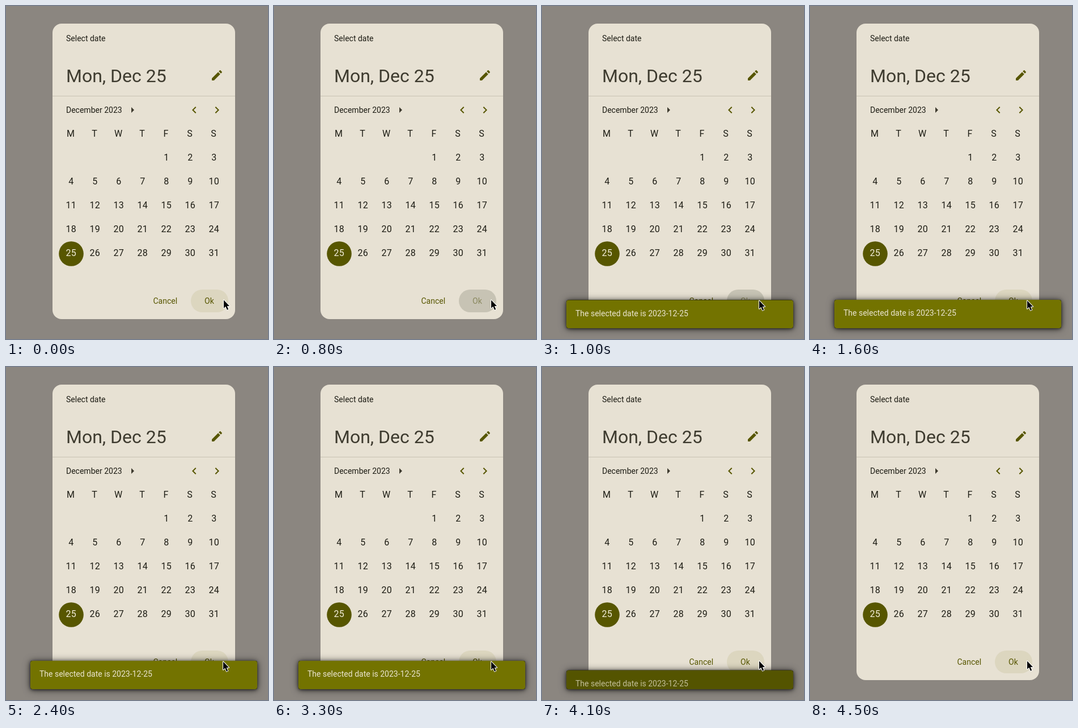
Animation, 462 px wide and 586 px high, one loop 7000 ms. Source, as an HTML page with a canvas:

```html
<!DOCTYPE html>
<html lang="en">
<head>
<meta charset="utf-8">
<title>Select date</title>
<style>
html, body { margin: 0; width: 100%; height: 100%; overflow: hidden; background: #8b8680; }
canvas { display: block; width: 462px; height: 586px; }
</style>
</head>
<body>
<canvas id="stage"></canvas>
<script>
const LOOP = 7000;
const W = 462, H = 586;
const OLIVE = '#575600', INK = '#1d1c14';
const canvas = document.getElementById('stage');
const ratio = window.devicePixelRatio || 1;
canvas.width = W * ratio;
canvas.height = H * ratio;
const ctx = canvas.getContext('2d');

const icons = {
  edit: new Path2D('M3 17.25V21h3.75L17.81 9.94l-3.75-3.75L3 17.25zM20.71 7.04c.39-.39.39-1.02 0-1.41l-2.34-2.34c-.39-.39-1.02-.39-1.41 0l-1.83 1.83 3.75 3.75 1.83-1.83z'),
  left: new Path2D('M15.41 7.41L14 6l-6 6 6 6 1.41-1.41L10.83 12z'),
  right: new Path2D('M10 6L8.59 7.41 13.17 12l-4.58 4.59L10 18l6-6z'),
  drop: new Path2D('M10 17l5-5-5-5z'),
  pointer: new Path2D('M0 0V14.2L3.3 11.2 5.9 17.2 8.2 16.2 5.7 10.4H10z')
};

const clamp = v => Math.min(1, Math.max(0, v));
const ramp = (t, from, to) => clamp((t - from) / (to - from));
const quart = v => v < 0.5 ? 8 * v ** 4 : 1 - (2 - 2 * v) ** 4 / 2;

function text(str, x, y, size, color, align = 'left') {
  ctx.font = `400 ${size}px Roboto, sans-serif`;
  ctx.textAlign = align;
  ctx.fillStyle = color;
  ctx.fillText(str, x, y);
}

function pill(x, y, w, h, r) {
  ctx.beginPath();
  ctx.roundRect(x, y, w, h, r);
}

function icon(path, x, y, color) {
  ctx.save();
  ctx.translate(x, y);
  ctx.fillStyle = color;
  ctx.fill(path);
  ctx.restore();
}

function drawCalendar() {
  [...'MTWTFSS'].forEach((d, i) => text(d, 114 + i * 42, 230, 16, INK, 'center'));
  ctx.fillStyle = OLIVE;
  ctx.beginPath();
  ctx.arc(115, 436, 21.8, 0, Math.PI * 2);
  ctx.fill();
  for (let day = 1; day <= 31; day++) {
    const cell = day + 3;
    const x = 114.8 + cell % 7 * 42;
    const y = 272 + Math.floor(cell / 7) * 42;
    ctx.letterSpacing = day > 9 ? '0.4px' : '0px';
    text(String(day), x, y, 16, day === 25 ? '#f3eedb' : INK, 'center');
  }
  ctx.letterSpacing = '0px';
}

function drawDialog() {
  ctx.fillStyle = '#e7e1d3';
  pill(82, 31, 322, 520, 16);
  ctx.fill();
  text('Select date', 106, 62, 14, INK);
  text('Mon, Dec 25', 106, 134, 32, '#3e3b2f');
  icon(icons.edit, 360, 110, OLIVE);
  ctx.fillStyle = '#c8c2b3';
  ctx.fillRect(82, 158, 322, 1);
  text('December 2023', 106, 188, 14, INK);
  icon(icons.drop, 211, 171, '#3e3b2f');
  icon(icons.left, 320, 171, OLIVE);
  icon(icons.right, 360, 171, OLIVE);
  drawCalendar();
  text('Cancel', 259.5, 524, 14, OLIVE);
}

function drawButton(t) {
  ctx.save();
  pill(326, 499, 66, 40, 20);
  ctx.fillStyle = '#dcd6bf';
  ctx.fill();
  ctx.clip();
  text('Ok', 350, 524, 14, OLIVE);
  const press = ramp(t, 480, 760) * (1 - ramp(t, 1000, 1300));
  if (press > 0) {
    ctx.globalAlpha = 0.54 * press;
    ctx.fillStyle = '#b5b3ac';
    ctx.beginPath();
    ctx.arc(376, 522, 14 + 46 * ramp(t, 480, 720), 0, Math.PI * 2);
    ctx.fill();
  }
  ctx.restore();
}

function drawSnackBar(t) {
  const v = t < 2500 ? ramp(t, 800, 1050) : 1 - ramp(t, 3988, 4238);
  const grow = quart(v);
  const h = 50 * grow;
  if (h < 0.5) return;
  const top = 567 - h;
  const leaving = t > 2500;
  const alpha = leaving ? grow ** 0.75 : ramp(v, 0.35, 0.65);

  ctx.save();
  ctx.globalAlpha = leaving ? clamp(grow * 1.5) : alpha;
  ctx.fillStyle = '#000';
  for (const [blur, shade] of [[13, 0.75], [5, 0.6]]) {
    ctx.shadowColor = `rgba(0,0,0,${shade})`;
    ctx.shadowBlur = blur * ratio;
    ctx.shadowOffsetY = ratio;
    pill(43, top, 400, h, Math.min(4, h / 2));
    ctx.globalAlpha *= 0.95;
    ctx.fill();
  }
  ctx.restore();

  ctx.save();
  ctx.globalAlpha = alpha;
  ctx.fillStyle = '#737300';
  pill(43, top, 400, h, Math.min(4, h / 2));
  ctx.fill();
  ctx.clip();
  text('The selected date is 2023-12-25', 59, top + 28, 14, '#ebe5d2');
  ctx.restore();
}

function drawPointer(t) {
  const x = t < 500 ? 384 : 383;
  const y = t >= 900 && t < 4000 ? 518.5 : 517.5;
  ctx.save();
  ctx.translate(x, y);
  ctx.lineJoin = 'round';
  ctx.lineWidth = 2;
  ctx.strokeStyle = '#fff';
  ctx.stroke(icons.pointer);
  ctx.fillStyle = '#000';
  ctx.fill(icons.pointer);
  ctx.restore();
}

const start = performance.now();

function frame() {
  const t = (performance.now() - start) % LOOP;
  ctx.setTransform(ratio, 0, 0, ratio, 0, 0);
  ctx.fillStyle = '#8b8680';
  ctx.fillRect(0, 0, W, H);
  drawDialog();
  drawButton(t);
  drawSnackBar(t);
  drawPointer(t);
  requestAnimationFrame(frame);
}
frame();
</script>
</body>
</html>
```
